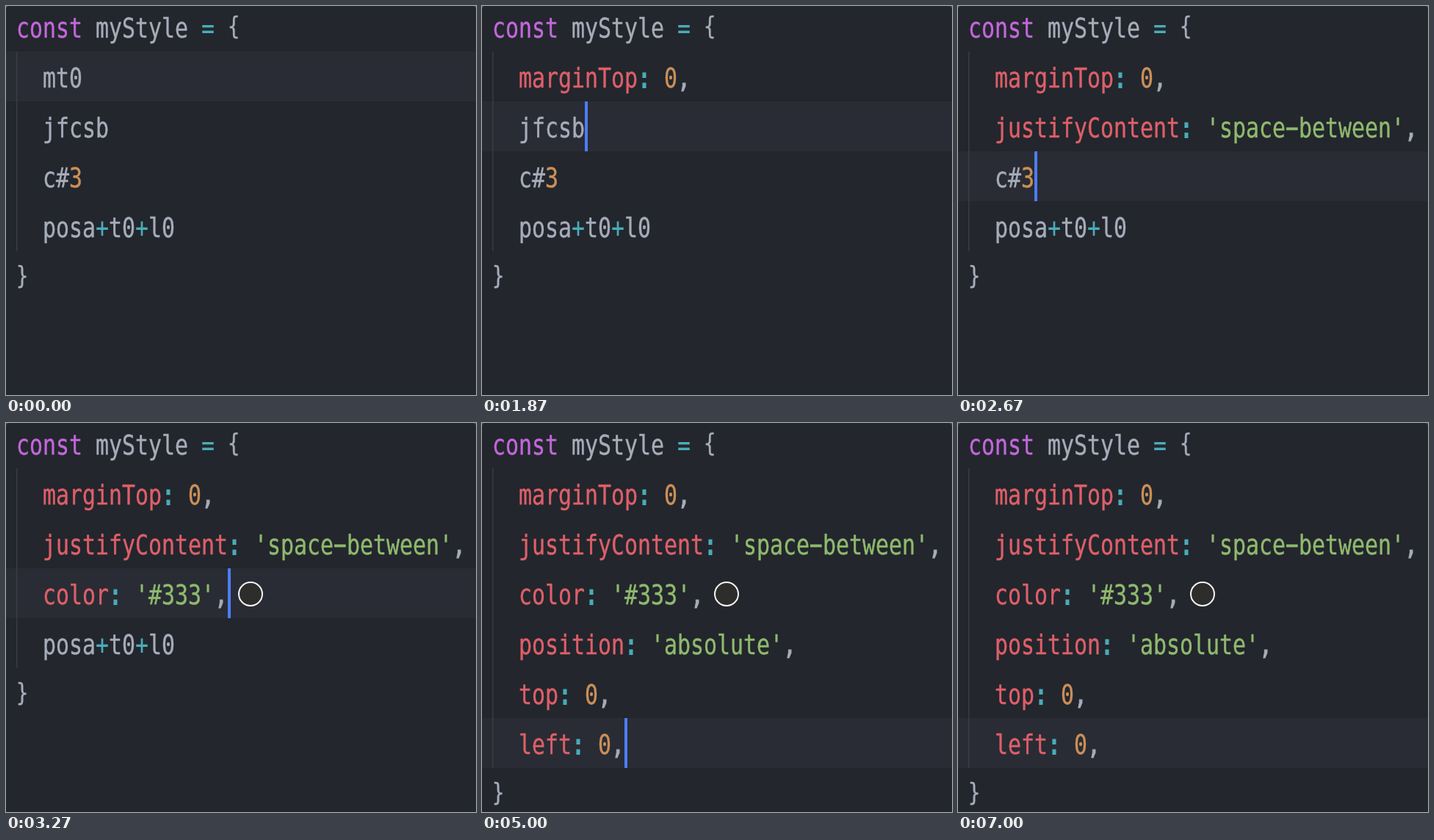
An HTML page for the animation above (7.07 s loop, 640 by 530 pixels).

```html
<!DOCTYPE html>
<html lang="en">
<head>
<meta charset="utf-8">
<title>Style shorthand</title>
<style>
  html, body { margin: 0; width: 100%; height: 100%; overflow: hidden; background: #4b4e54; }
  svg { display: block; width: 100vw; height: 100vh; }
  text { font: 37.5px "DejaVu Sans Mono", "Noto Sans Mono", monospace; white-space: pre; stroke-width: .45px; }
  .plain, .brace, .comma { fill: #a6acb9; stroke: #a6acb9; }
  .word { fill: #c267da; stroke: #c267da; }
  .op, .colon { fill: #4aacb9; stroke: #4aacb9; }
  .op { stroke-width: .2px; }
  .colon { stroke-width: 1.8px; }
  .comma { stroke-width: 1.2px; }
  .brace { font-size: 34px; baseline-shift: 3px; }
  .key { fill: #de5f69; stroke: #de5f69; }
  .num { fill: #cb9058; stroke: #cb9058; }
  .str { fill: #8fba6e; stroke: #8fba6e; }
</style>
</head>
<body>
<svg viewBox="0 0 640 530" preserveAspectRatio="none">
  <path d="M0 530V5Q0 0 5 0H635Q640 0 640 5V530Z" fill="#23262d"/>
  <rect id="band" width="640" height="68" fill="#292c34"/>
  <rect id="guide" x="14" y="62" width="1.5" fill="#383c44"/>
  <g id="code"></g>
  <circle id="swatch" cx="333" cy="233" r="16" fill="#2d2d2c" stroke="#f4f4f4" stroke-width="2"/>
  <rect id="caret" width="4" height="68" fill="#4d7df5"/>
</svg>
<script>
const LOOP = 7070, LEFT = 14, TOP = -6, CELL = 18, ROW = 68, BASE = 48.5;
const SQUEEZE = CELL / (37.5 * 0.602); // condensed face, one ratio for all text
const byId = id => document.getElementById(id);
const [band, guide, code, swatch, caret] = ['band', 'guide', 'code', 'swatch', 'caret'].map(byId);

const token = (kind, text) => ({ kind, text });
const plain = text => token('plain', text);
const prop = (name, kind, value) =>
  [token('key', name), token('colon', ':'), plain(' '), token(kind, value), token('comma', ',')];

const HEAD = [token('word', 'const'), plain(' myStyle '), token('op', '='), plain(' '), token('brace', '{')];
const TAIL = [token('brace', '}')];

// Each shorthand and the lines it expands to at time "at"
const rules = [
  { at: 1070, short: [plain('mt0')], full: [prop('marginTop', 'num', '0')] },
  { at: 2200, short: [plain('jfcsb')], full: [prop('justifyContent', 'str', "'space\u2212between'")] },
  { at: 3070, short: [plain('c#'), token('num', '3')], full: [prop('color', 'str', "'#333'")] },
  { at: 4330,
    short: [plain('posa'), token('op', '+'), plain('t0'), token('op', '+'), plain('l0')],
    full: [prop('position', 'str', "'absolute'"), prop('top', 'num', '0'), prop('left', 'num', '0')] }
];
const moves = [1670, 2670, 3670];
const blinks = [70, 530, 930, 1470, 1670, 2070, 2200, 2600, 2670, 3470, 3670, 4070,
  4330, 4600, 5000, 5400, 5800, 6200, 6600, 7000];

const passed = (times, t) => times.filter(at => t >= at).length;
const lengthOf = line => line.reduce((sum, part) => sum + part.text.length, 0);

function drawLine(line, row, indent) {
  const spans = line.map(p => `<tspan class="${p.kind}">${p.text}</tspan>`).join('');
  const x = LEFT + indent * CELL, y = TOP + row * ROW + BASE;
  return `<text transform="translate(${x} ${y}) scale(${SQUEEZE} 1)">${spans}</text>`;
}

let shown = -1;
function render(t) {
  const expanded = passed(rules.map(r => r.at), t);
  const body = rules.flatMap((r, i) => i < expanded ? r.full : [r.short]);
  if (expanded !== shown) {
    shown = expanded;
    code.innerHTML = drawLine(HEAD, 0, 0)
      + body.map((line, i) => drawLine(line, i + 1, 2)).join('')
      + drawLine(TAIL, body.length + 1, 0);
    guide.setAttribute('height', body.length * ROW);
    swatch.style.display = expanded > 2 ? '' : 'none';
  }
  const row = expanded === rules.length ? body.length : 1 + passed(moves, t);
  const y = TOP + row * ROW;
  band.setAttribute('y', y);
  caret.setAttribute('y', y);
  caret.setAttribute('x', LEFT + (2 + lengthOf(body[row - 1])) * CELL);
  caret.style.display = passed(blinks, t) % 2 ? '' : 'none';
}

const start = performance.now();
function tick() {
  render((performance.now() - start) % LOOP);
  requestAnimationFrame(tick);
}
tick();
</script>
</body>
</html>
```
